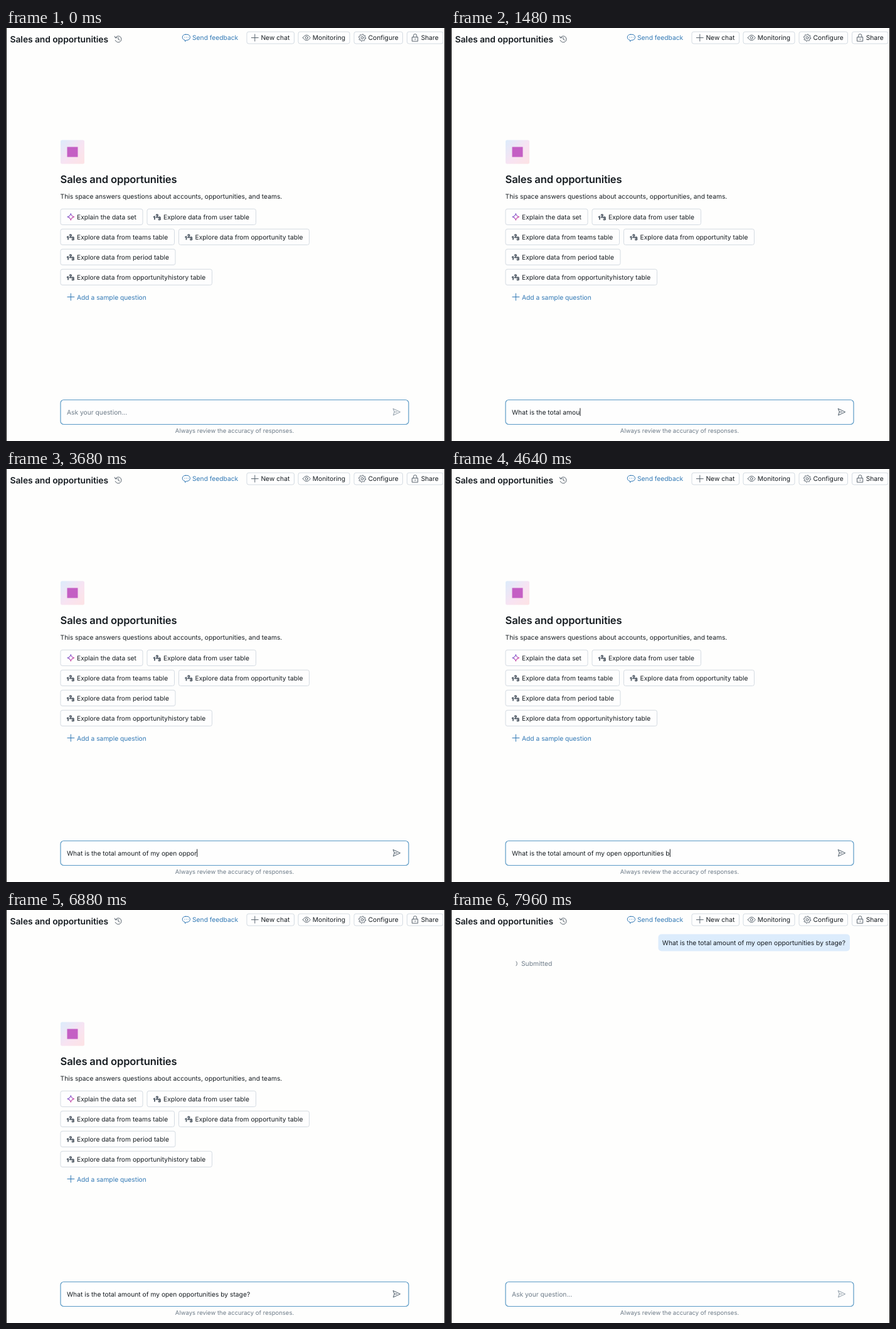
An HTML page that plays this animation: 700x658 px, repeating every 8 s.

```html
<!DOCTYPE html>
<html lang="en">
<head>
<meta charset="utf-8">
<title>Sales and opportunities</title>
<style>
  html, body { margin: 0; width: 100%; height: 100%; overflow: hidden; background: #fefefd; }
  svg { display: block; width: 100vw; height: 100vh; }
  text {
    font: 10.27px Inter, Roboto, sans-serif; font-optical-sizing: none;
    text-rendering: geometricPrecision; white-space: pre; fill: #171d22;
  }
  text.title { font-weight: 600; font-size: 13.9px; letter-spacing: -.09px; }
  text.heading { font-weight: 600; font-size: 16.6px; letter-spacing: -.15px; }
  text.muted { fill: #6d7b88; }
  text.small { font-size: 9.5px; text-anchor: middle; }
  text.digit { font-size: 7px; font-weight: 600; }
  .link text { fill: #3279b5; }
  .link { stroke: #3279b5; }
  .link text, .icon text { stroke: none; }
  .icon { fill: none; stroke: #59646e; stroke-linecap: round; stroke-linejoin: round; }
  .link .icon { stroke: inherit; }
  .box { fill: #fefefe; stroke: #d4dbe2; }
</style>
</head>
<body>
<svg viewBox="0 0 700 658">
  <defs>
    <linearGradient id="tile" x2="1" y2="1">
      <stop stop-color="#dcecfb"/><stop offset=".55" stop-color="#f8e3f2"/><stop offset="1" stop-color="#fde3e4"/>
    </linearGradient>
    <linearGradient id="spark" x2="1" y2="1">
      <stop stop-color="#5b78d8"/><stop offset=".55" stop-color="#b757c4"/><stop offset="1" stop-color="#e8547c"/>
    </linearGradient>
    <path id="plus" d="M-5.5 0H5.5M0-5.5V5.5"/>
    <path id="sparkle" d="M0-5.3Q1-1 5.3 0Q1 1 0 5.3Q-1 1-5.3 0Q-1-1 0-5.3Z"/>
    <g id="numbers">
      <text class="digit" x="-6.2" y="3.6" style="fill:#5d70cf">1</text>
      <text class="digit" x="-2.6" y=".8" style="fill:#a455c3">2</text>
      <text class="digit" x="1.3" y="5.2" style="fill:#e2566f">3</text>
    </g>
  </defs>
  <rect width="700" height="658" fill="#fefefd"/>

  <g id="header">
    <text class="title" x="6.5" y="22.9">Sales and opportunities</text>
    <g class="icon" transform="translate(179 17.8)">
      <path d="M-4.4-2.4A5 5 0 1 1-4.7 1.8M-5.6-4.6L-4.6-1.9L-1.9-2.4M0-2.6V.4L2.2 1.4"/>
    </g>
    <g class="link">
      <path class="icon" transform="translate(287.5 15.3)"
        d="M-1.5-5H1.5A4.5 4.5 0 0 1 1.5 4H.5L-2 6V4A4.5 4.5 0 0 1-1.5-5ZM-2.7-.5H-2.6M0-.5H.1M2.7-.5H2.8"/>
      <text x="297" y="19.2">Send feedback</text>
    </g>
  </g>

  <g id="intro">
    <rect x="87" y="178.5" width="38" height="38" rx="2.5" fill="url(#tile)"/>
    <rect x="97.5" y="189.5" width="17" height="16" fill="#c45fc4"/>
    <text class="heading" x="86.5" y="247">Sales and opportunities</text>
    <text x="86.5" y="271.6">This space answers questions about accounts, opportunities, and teams.</text>
    <g class="link">
      <use class="icon" href="#plus" x="103.4" y="428.5"/>
      <text x="113" y="432.7">Add a sample question</text>
    </g>
  </g>

  <g id="chat">
    <rect x="330.5" y="38.5" width="305.5" height="27" rx="5" fill="#dcecfc"/>
    <text id="message" x="336.8" y="55.6">What is the total amount of my open opportunities by stage?</text>
    <path id="spinner" class="icon" d="M3.4-3.4A4.8 4.8 0 0 1 3.4 3.4" stroke-width=".9"/>
    <text id="status" class="muted" x="112" y="89.1"></text>
  </g>

  <rect x="87" y="592.5" width="555" height="39" rx="5" fill="#fefefe" stroke="#5b9ac6" stroke-width="1.2"/>
  <text id="placeholder" class="muted" x="97" y="615.7">Ask your question...</text>
  <text id="typed" x="97" y="615.7" xml:space="preserve"></text>
  <rect id="caret" y="605.6" width="1" height="12.4" fill="#171d22"/>
  <path id="send" class="icon" d="M617.5 606.6L628.6 611.8L617.5 617L619.2 611.8ZM619.2 611.8H623.5"/>
  <text class="muted small" x="364.5" y="644.6">Always review the accuracy of responses.</text>

  <path d="M.5 0V658M699.5 0V658" stroke="#111"/>
</svg>
<script>
const $ = id => document.getElementById(id);
const LOOP = 8000, SUBMIT = 7160, SUBMITTED = 7640;

const gear = () => {
  const points = [];
  for (let i = 0; i < 32; i++) {
    const r = i % 4 < 2 ? 5.7 : 4.3, a = (i + .5) * Math.PI / 16;
    points.push(`${(r * Math.cos(a)).toFixed(2)} ${(r * Math.sin(a)).toFixed(2)}`);
  }
  return `<path d="M${points.join('L')}Z"/><circle r="1.9"/>`;
};

const icons = {
  plus: '<use href="#plus"/>',
  eye: '<path d="M-6 0Q-3.2-4.3 0-4.3T6 0Q3.2 4.3 0 4.3T-6 0Z"/><circle r="2"/>',
  gear: gear(),
  lock: '<path d="M-4.4-1H4.4V5.6H-4.4ZM-2.6-1V-3.3A2.6 2.6 0 0 1 2.6-3.3V-1M0 1.4V3"/>',
  sparkle: '<use href="#sparkle" fill="none" stroke="url(#spark)" stroke-width="1.2"/>',
  numbers: '<use href="#numbers"/>'
};

function button(parent, x, y, width, height, icon, iconX, textX, label) {
  const middle = y + height / 2;
  parent.insertAdjacentHTML('beforeend', `
    <rect class="box" x="${x}" y="${y}" width="${width}" height="${height}" rx="3"/>
    <g class="icon" transform="translate(${x + iconX} ${middle})">${icons[icon]}</g>
    <text x="${x + textX}" y="${middle + 3.7}">${label}</text>`);
}

[
  [384, 75.5, 'plus', 12.8, 22.4, 'New chat'],
  [466, 82, 'eye', 13.3, 22.8, 'Monitoring'],
  [555, 77.5, 'gear', 13, 22.6, 'Configure'],
  [639.5, 57.5, 'lock', 12.8, 22.2, 'Share']
].forEach(([x, width, ...rest]) => button($('header'), x, 6, width, 19, ...rest));

[
  [87, 288, 131, 'sparkle', 'Explain the data set'],
  [225, 288, 173.5, 'numbers', 'Explore data from user table'],
  [87, 320, 181.5, 'numbers', 'Explore data from teams table'],
  [275.5, 320, 208, 'numbers', 'Explore data from opportunity table'],
  [87, 352, 183, 'numbers', 'Explore data from period table'],
  [87, 384, 241.5, 'numbers', 'Explore data from opportunityhistory table']
].forEach(([x, y, width, icon, label]) =>
  button($('intro'), x, y + .3, width, 25.2, icon, 16.3, 26, label));

// Bursts of typing: first key time, last key time, keys
const bursts = [
  [40, 760, 'What is the to'], [840, 840, 't'], [920, 1680, 'al amount '],
  [1800, 2040, 'of my'], [2240, 2240, ' '], [2480, 2680, 'open'],
  [2960, 3280, ' opp'], [3440, 3440, 'o'], [3680, 3680, 'r'],
  [3880, 4480, 'tunities '], [4640, 4800, 'by '], [4960, 5120, 'sta'],
  [5320, 5360, 'ge'], [5600, 5600, '?']
];
const keys = bursts.flatMap(([start, end, text]) => [...text].map((char, i) =>
  ({ char, time: start + (end - start) * i / Math.max(1, text.length - 1) })));

const show = (id, visible) => { $(id).style.display = visible ? '' : 'none'; };

function draw(t) {
  const submitted = t >= SUBMIT;
  const text = submitted ? '' : keys.filter(key => key.time <= t).map(key => key.char).join('');
  show('intro', !submitted);
  show('chat', submitted);
  show('placeholder', !text);
  $('typed').textContent = text;
  $('send').style.stroke = text ? '#4c5b68' : '#8c9aa6';

  const caretOn = t < 6040 || (t >= 6480 && t < 6880);
  show('caret', text && caretOn);
  if (text) $('caret').setAttribute('x', 97.2 + $('typed').getComputedTextLength());

  if (submitted) {
    const elapsed = t - SUBMIT, done = t >= SUBMITTED;
    const rise = 6 * (1 - Math.min(1, elapsed / 240)) ** 2;
    $('chat').setAttribute('transform', `translate(0 ${rise})`);
    $('message').style.fill = done ? '' : '#7489a0';
    $('status').textContent = done ? 'Submitted' : 'Submitting';
    $('spinner').setAttribute('transform', `translate(100.6 85.4) rotate(${elapsed * 405 / 800 - 45})`);
  }
}

const begin = performance.now();
function tick() {
  draw((performance.now() - begin) % LOOP);
  requestAnimationFrame(tick);
}
tick();
</script>
</body>
</html>
```
